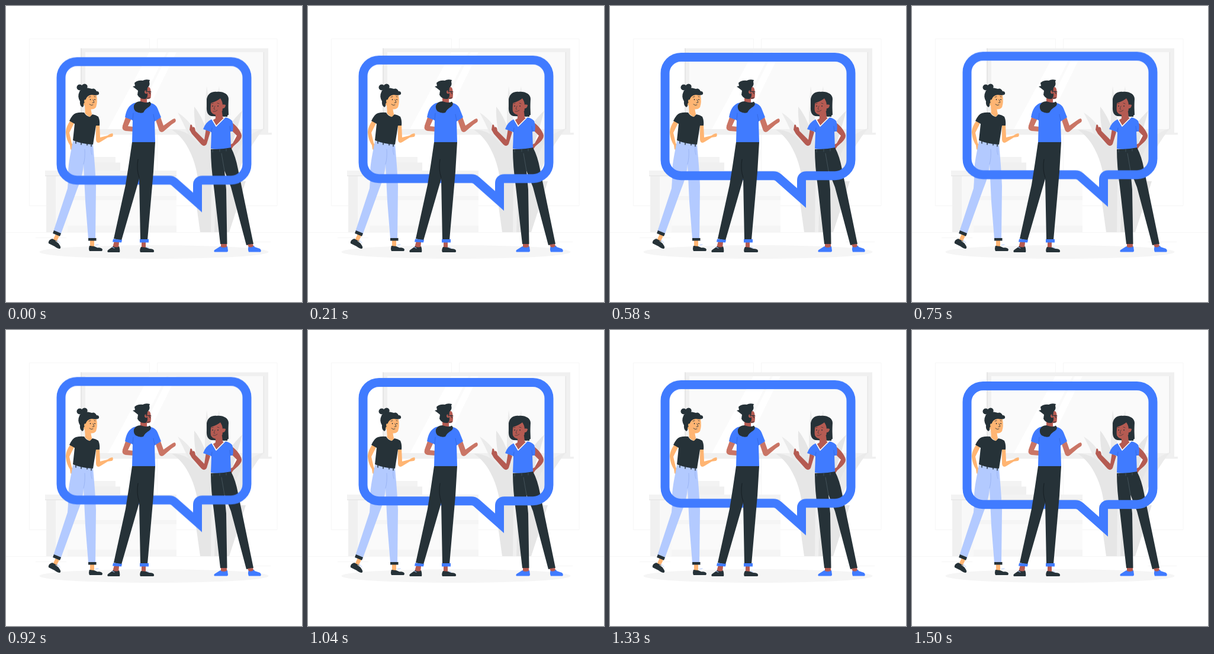
Recreate the animation shown at these times as an HTML page. Size 500 by 500 pixels, loop 1540 ms.

```html
<!DOCTYPE html>
<html lang="en">
<head>
<meta charset="utf-8">
<title>Conversation</title>
<style>
  html, body { margin: 0; width: 100%; height: 100%; overflow: hidden; background: #fff; }
  svg { display: block; width: 100%; height: 100%; }
  .ink { fill: #263238; }
  .blue { fill: #407bff; }
  .denim { fill: #b3caff; }
  .light { fill: #ffb573; }
  .brown { fill: #b55b52; }
  .tan { fill: #ca7565; }
  .line { fill: none; stroke-linecap: round; stroke-linejoin: round; }
  .bubble {
    fill: none; stroke: #407bff; stroke-width: 15; stroke-miterlimit: 10;
    animation: float 1540ms -5ms infinite;
  }
  /* 37 even ticks: up 10 units and back */
  @keyframes float {
    0% { transform: translateY(-.54px); animation-timing-function: steps(17, end); }
    45.946% { transform: translateY(-9.73px); }
    48.649% { transform: translateY(-9.73px); animation-timing-function: steps(18, end); }
    97.297%, 100% { transform: translateY(0); }
  }
</style>
</head>
<body>
<svg viewBox="0 0 500 500">
  <g id="room">
    <path d="M0 382.5H500M39.500 55.500H242.500V337.500H39.500ZM255.500 55.500H458V337.500H255.500ZM50 391.500H102M398 398.500H447" fill="none" stroke="#f6f6f6"/>
    <path d="M126 71.500H443V214H126Z" fill="#f0f0f0"/>
    <path d="M126 71.500H128V214H126Z" fill="#e6e6e6"/>
    <path d="M134 78H436V208H134Z" fill="#fafafa"/>
    <path d="M242 78H271L206 208H172ZM275 78H288L224 208H211Z" fill="#fff"/>
    <path d="M434.500 78H436V208H434.500Z" fill="#e6e6e6"/>
    <path d="M120 214H449V217.500H120Z" fill="#f0f0f0"/>
  </g>

  <g id="cabinet">
    <path d="M126 255H185V265H193V278H126Z" fill="#f3f3f3"/>
    <path d="M126 264.500H193V278H126Z" fill="#f0f0f0"/>
    <path d="M84 286H288V382H84Z" fill="#f8f8f8"/>
    <path d="M68 286H84V382H68Z" fill="#f0f0f0"/>
    <path d="M104 292H288V321H104ZM104 328H288V371H104Z" fill="#fafafa"/>
    <path d="M104 321H288V328H104ZM104 371H288V382H104Z" fill="#f5f5f5"/>
    <path d="M66 278H288V286H66Z" fill="#f3f3f3"/>
    <path d="M66 286H288V287.500H66Z" fill="#e8e8e8"/>
  </g>

  <g id="plant" fill="#e6e6e6">
    <path d="M339 135C347 184 353 250 353 300H341C335 250 334 186 339 135Z" fill="#ebebeb"/>
    <path d="M360 135C365 187 361 250 357 300H346C347 245 350 188 360 135Z" fill="#ebebeb"/>
    <path d="M290 180C322 200 346 250 348 300H332C327 259 308 213 290 180Z" fill="#ebebeb"/>
    <path d="M318 170C342 200 352 250 352 300H338C334 254 316 212 318 170Z"/>
    <path d="M280 209C312 208 339 235 344 300H325C322 262 305 224 280 209Z"/>
    <path d="M399 177C389 215 375 250 367 300H350C352 250 366 207 399 177Z"/>
    <path d="M435 207C418 230 397 262 385 300H365C373 258 403 215 435 207Z" fill="#ebebeb"/>
    <path d="M415 206C399 229 382 260 374 300H356C362 258 382 217 415 206Z"/>
    <path d="M316 296H405L377 382H328Z"/>
    <path d="M347 296H355L352 382H346Z" fill="#f0f0f0"/>
  </g>
  <ellipse cx="250" cy="415.500" rx="193.500" ry="11.500" fill="#f5f5f5"/>

  <g id="guest">
    <path class="light" d="M109 193C104 200 101 207 101 214C102 223 104 229 108 235L109 242L113 245L116 242L115 236L111 232L107 214L115 198Z"/>
    <path class="light" d="M152 199L152 226Q153 233 159 230L172 222L179 221Q182 219 180 215L176 216L171 219L159 222L158 200Z"/>
    <path class="denim" d="M113 228L147 234C149 256 151 278 152 304L151 393H139L134 330L131 268C130 283 125 298 120 310L92 387L80 381L104 308Q105 297 105 284C105 264 110 246 113 228Z"/>
    <path class="line" d="M131 267Q134 257 133 242M144 237Q143 246 145 251" stroke="#91adef" stroke-width=".7"/>
    <path class="light" d="M84 385L90 388L86 397L79 396ZM142 395H149L149 408H142Z"/>
    <path class="ink" d="M81 379L93 384L91 389L79 384ZM139 392H152.500V396.500H139Z"/>
    <path class="ink" d="M78 393L86 397L90 403Q94 408 91 410Q87 410 82 406L72 401Q71 398 74 395ZM141 405L149 406L154 408Q163 408 163 412L162 414H141Q139 410 141 405Z"/>
    <path class="line" d="M84 397L88 400M150 405L155 408" stroke="#fff"/>
    <path class="line" d="M86 395L91 400M151 404L156 403" stroke="#b3caff"/>
    <path class="light" d="M133 169L143 173L145 185Q141 189 134 182Z"/>
    <path class="ink" d="M118 181Q125 179 132 180Q136 187 142 187L146 183Q152 184 156 187Q159 194 158 202L152 202L147 234Q128 233 113 227L116 199L107 194Q112 183 118 181Z"/>
    <path class="light" d="M133 180L141 187.500L145 183L143 174Z"/>
    <path class="line" d="M118 226V232M127 228V234M137 230V235M144 231V237" stroke="#263238" stroke-width="1.500"/>
    <path class="light" d="M130 153Q141 146 153 151Q155 162 152 171Q148 176 140 174Q133 171 130 164Z"/>
    <circle class="ink" cx="124.500" cy="137.500" r="5"/>
    <path class="ink" d="M126 140C126 134 131 130 135 132C139 134 138 139 135 141Z"/>
    <path class="ink" d="M124 145C126 138 138 137 145 140Q150 138 153 144Q158 144 157 149Q154 152 145 150Q137 151 135 157L135 164Q132 161 131 166Q132 169 129 171Q124 168 125 161Q120 153 124 145Z"/>
    <path class="light" d="M137 159Q132 156 132 161Q133 166 138 166Z"/>
    <path class="ink" d="M142.500 157a.8 1 0 1 0 .1 0M150 157a.8 1 0 1 0 .1 0"/>
    <path class="line" d="M140 154L143 153M149 153L151 153.500M141 166Q144 169 147 167M147 158L149 163L146 163.500" stroke="#263238" stroke-width=".8"/>
  </g>

  <g id="host">
    <path class="brown" d="M338 207L335 226L320 211L319 206Q317 203 315 205L314 201Q311 199 311 203L310 209L314 216L330 234Q336 239 339 233L345 213Z"/>
    <path class="brown" d="M378 195C387 199 397 211 398 219Q398 224 392 230L384 237L380 243L374 242L377 235L383 232L390 219L378 207Z"/>
    <path class="ink" d="M346 242L380 239Q388 254 392 276L418 402L406 404L380 306L369 278L372 310L373.500 402H362L351 305Q346 270 346 242Z"/>
    <path class="line" d="M369 278L364 249M349 243V247M361 242V246M372 241V245" stroke="#506068" stroke-width=".7"/>
    <path class="blue" d="M362 406H374L375 413Q375 415.500 373 415.500H352Q350 413 354 411ZM410 405L419 405L420 407L429 410Q432 413 430 415.500H410Q408 411 410 405Z"/>
    <path class="brown" d="M363 402H373L373 407Q367 409 363 407ZM408 403L417 402L418 406Q414 409 410 407Z"/>
    <path class="ink" d="M339 157C341 147 349 144 356 145C367 144 376 149 376 157L374 187L347 186Q338 184 339 170Z"/>
    <path class="brown" d="M354 179H365L366 188L369 190L355 204L349 193L354 190Z"/>
    <path class="blue" d="M348 191L355 204L370 188Q377 189 382 194Q385 203 383 212L379 212L380 239Q361 243 346 241L347 213L333 208Q337 196 348 191Z"/>
    <path class="line" d="M348 191L355 203L370 188" stroke="#fff" stroke-width="1.500"/>
    <path class="line" d="M379 212L378 203M347 213L348 206" stroke="#3062d6" stroke-width=".7"/>
    <path class="brown" d="M347 162Q356 161 362 156Q366 162 366 167Q371 162 372 168Q371 173 366 173Q366 182 357 184Q349 184 346 178Q344 169 347 162Z"/>
    <path class="ink" d="M342 153Q354 147 365 153Q357 161 346 164L345 181Q339 176 341 164ZM365 153L375 157L376 184L367 187L366 174Q371 172 371 167L366 166Z"/>
    <path class="ink" d="M349 168a.8 1 0 1 0 .1 0M358 168a.8 1 0 1 0 .1 0"/>
    <path class="line" d="M347 165L350 164.500M357 164L360 165M353 169L351 174L353 174.500M350 178Q354 179 357 176" stroke="#263238" stroke-width=".6"/>
  </g>

  <path class="bubble" d="M120 94.500H380A27 27 0 0 1 407 121.500V267.700A27 27 0 0 1 380 294.700H332Q323.500 294.700 323.500 303.200V332.400L284 297.500Q280.500 294.700 276 294.700H120A27 27 0 0 1 93 267.700V121.500A27 27 0 0 1 120 94.500Z"/>

  <g id="speaker">
    <path class="tan" d="M202 188L197 202Q195 210 202 211L215 212V204L206 203L212 190Z"/>
    <path class="tan" d="M253 193L258 208Q260 215 266 212L280 200L286 196Q288 192 285 190L282 191L276 195L266 202L261 188Z"/>
    <path class="ink" d="M213 230H252L249 280L239 395H227L225 292L195 396L182 393L202 302Q208 265 213 230Z"/>
    <path class="line" d="M225 290Q220 276 223 259" stroke="#10181c" stroke-width=".7"/>
    <path class="brown" d="M183 397L191 399L190 409L180 408ZM229 398H236V410H229Z"/>
    <path class="blue" d="M181 393.500L196 395L195 399.500L180 398.500ZM226 394H241V399.500H226Z"/>
    <path class="ink" d="M181 406Q187 409 191 406Q193 411 192 416H172Q170 413 174 411ZM228 407L237 408L242 410Q251 410 250 415L249 416H227Q225 412 228 407Z"/>
    <path class="line" d="M179 407L183 409M237 407L242 409" stroke="#b3caff"/>
    <path class="blue" d="M216 164Q230 160 245 164Q253 166 256 173L262 188L251 195L252 230H213L214 193L201 188Q204 169 216 164Z"/>
    <path class="line" d="M214 193L215 181M251 194L249 183" stroke="#3062d6" stroke-width=".7"/>
    <path class="brown" d="M227 147L239 136L243 138Q246 144 244.500 155Q242 158 238 157L238 166H227Z"/>
    <path class="ink" d="M216 168Q219 161 227 161Q238 165 243 161.500Q247 166 242 170Q235 174 232 180Q226 182 219 178Q215 174 216 168Z"/>
    <path class="ink" d="M217 130Q222 125 231 126Q236 123 243 125L242 128Q244 134 239 138L238 146Q241 153 236 157Q226 158 222 150L223 143L218 139L214 136L218 135Z"/>
    <path class="brown" d="M237 143Q234 141 234 146Q235 149 238 148Z"/>
    <path class="line" d="M236 144L245 145M242 144Q241 149 244 148M238 156L243 155" stroke="#263238" stroke-width="1"/>
  </g>
</svg>
</body>
</html>
```
